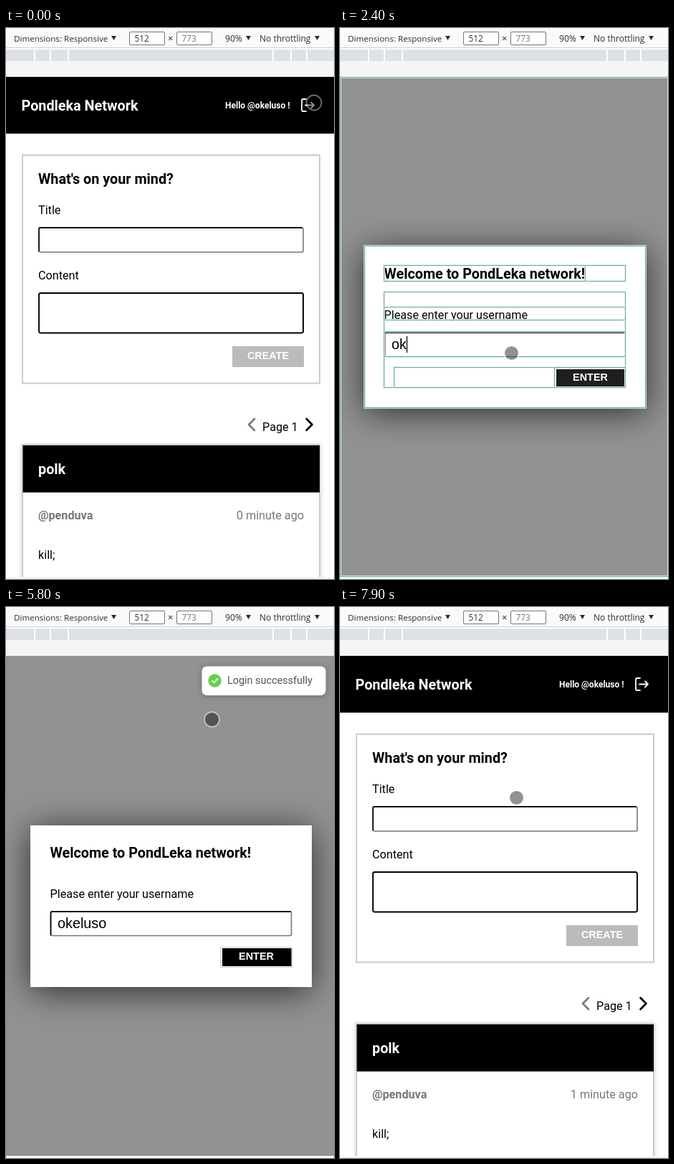
These frames come from a looping animation (458 by 767 pixels, 8000 ms). An HTML page:

```html
<!DOCTYPE html>
<html lang="en">
<head>
<meta charset="utf-8">
<title>Login flow</title>
<style>
  html, body { margin: 0; width: 100%; height: 100%; overflow: hidden; background: #fff; }
  svg { display: block; }
  text { font: 16.2px Roboto, sans-serif; white-space: pre; }
  .h { font-size: 19.8px; font-weight: 700; }
  .ui text { font: 11.8px "Open Sans", sans-serif; fill: #2b2e33; }
  .btn { font: bold 14.4px "Liberation Sans", Arial, sans-serif; fill: #fff; text-anchor: middle; }
  .field { fill: #fff; stroke: #777; stroke-width: 1.6; }
  .edge { fill: none; stroke: #111; stroke-width: 1.8; }
  .icon { fill: none; stroke-width: 2.6; stroke-linecap: round; stroke-linejoin: round; }
  #typed { font: 19.8px "Liberation Sans", Arial, sans-serif; }
  #panel { filter: drop-shadow(0 6px 24px rgba(0, 0, 0, .7)); }
  #card { filter: drop-shadow(0 1px 3px rgba(0, 0, 0, .2)); }
  .glow { fill: none; stroke: #f0f0f0; opacity: .8; }
  .line { fill: none; stroke: currentColor; }
</style>
</head>
<body>
<svg width="458" height="767" viewBox="0 0 458 767">
  <clipPath id="view"><rect y="68" width="458" height="696"/></clipPath>

  <g class="ui">
    <rect width="458" height="767" fill="#f4f5f6"/>
    <rect width="458" height="27" fill="#f9fafb"/>
    <rect y="27" width="458" height="1" fill="#cbced2"/>
    <rect y="28" width="458" height="2" fill="#fff"/>
    <rect y="30" width="458" height="16" fill="#dee1e6"/>
    <path d="M40 30v16M62 30v16M87 30v16M373 30v16M398 30v16M420 30v16" stroke="#fff" stroke-width="2"/>
    <g fill="#fff" stroke="#767676">
      <rect x="172.5" y="5.5" width="49" height="18" rx="1.5"/>
      <rect x="238.5" y="5.5" width="49" height="18" rx="1.5"/>
    </g>
    <path d="M147 11h7l-3.5 6zM335 11h7l-3.5 6zM431 11h7l-3.5 6z" fill="#2b2e33"/>
    <text x="11" y="19" style="font-size:11.6px">Dimensions: Responsive</text>
    <text x="179.500" y="19">512</text>
    <text x="226" y="19" style="font-size:13px">×</text>
    <text x="245.500" y="19" style="fill:#777">773</text>
    <text x="306" y="19" style="font-size:12.1px">90%</text>
    <text x="354" y="19" style="font-size:12px">No throttling</text>
  </g>

  <g clip-path="url(#view)">
    <g id="home">
      <rect y="68" width="458" height="696" fill="#fff"/>
      <rect y="68" width="458" height="79"/>
      <text class="h" x="21.500" y="115" fill="#fff">Pondleka Network</text>
      <text x="306" y="112" fill="#fff" style="font-size:12px;font-weight:700">Hello @okeluso !</text>
      <path class="icon" style="stroke-width:1.8" stroke="#fff"
        d="M419 99h-4q-2 0-2 2v13q0 2 2 2h4M418 107.500h12M426 103.500l4 4-4 4"/>

      <rect x="23" y="177" width="415" height="317.500" fill="#fff" stroke="#ccc" stroke-width="2"/>
      <text class="h" x="45" y="217">What's on your mind?</text>
      <text x="45" y="259">Title</text>
      <rect class="field" x="46" y="278" width="369" height="34" rx="2"/>
      <path class="edge" d="M46 311V280q0-2 2-2H414"/>
      <text x="45" y="350">Content</text>
      <rect x="46" y="369" width="369" height="55.500" rx="2.500" fill="#fff" stroke="#000" stroke-width="1.900"/>
      <rect x="316" y="443" width="100" height="29" fill="#bbb"/>
      <text class="btn" x="366" y="461">CREATE</text>

      <path class="icon" stroke="#777" d="M347 544l-8 8 8 8"/>
      <path class="icon" stroke="#000" d="M419.500 544l8 8-8 8"/>
      <text x="358" y="561">Page 1</text>

      <rect id="card" x="23" y="580" width="415" height="220" fill="#fff" stroke="#ccc" stroke-width="2"/>
      <rect x="23.500" y="581" width="414.500" height="65.500"/>
      <text class="h" x="45" y="621" fill="#fff">polk</text>
      <text x="45" y="684" fill="#777" font-weight="700" style="font-weight:700">@penduva</text>
      <text id="age" x="416" y="684" fill="#777" text-anchor="end"></text>
      <text x="45" y="739">kill;</text>
    </g>

    <g id="login">
      <rect y="68" width="458" height="696" fill="#929292"/>
      <rect id="panel" x="34" y="304" width="393" height="225" fill="#fff"/>
      <text class="h" x="61.500" y="349">Welcome to PondLeka network!</text>
      <text x="61.500" y="405">Please enter your username</text>
      <rect class="field" x="62.500" y="424" width="336" height="33.500" rx="2"/>
      <path class="edge" d="M62.500 457V426q0-2 2-2H398"/>
      <text id="typed" x="72" y="447"></text>
      <rect id="caret" y="429" width="1.200" height="23"/>
      <rect id="frame" x="299.500" y="473.500" width="100" height="28"/>
      <rect id="fill" x="302" y="475" width="96.500" height="25"/>
      <text class="btn" x="349.500" y="491">ENTER</text>
    </g>

    <g id="toast">
      <rect x="273.500" y="82.500" width="173" height="40.500" rx="7" fill="#fff"
        style="filter:drop-shadow(0 1px 4px rgba(0,0,0,.25))"/>
      <g id="badge">
        <circle r="9.200" fill="#61d345"/>
        <path id="tick" class="icon" style="stroke-width:2" stroke="#fff" d="M-3.500.5l2.500 2.500 4.500-5.500"/>
      </g>
      <text x="309" y="107" fill="#555" style="font-size:14.4px">Login successfully</text>
    </g>

    <g id="marks"></g>
    <g id="pointer">
      <circle id="dot" r="9.500"/>
      <circle r="10.500" fill="none" stroke="#fff" stroke-opacity=".42" stroke-width="1.800"/>
    </g>
  </g>
</svg>
<script>
const $ = id => document.getElementById(id);
const NAME = 'okeluso';
const KEYS = [2200, 2300, 2900, 3000, 3000, 3100, 3200];
const TEAL = '#55b5ac';
// highlight colour after each key press
const HEAT = [TEAL, '#63b19e', '#80b393', '#97b488', '#abb67d', '#beb771', '#cfb965'];
// pointer stops: time, x, y
const PATH = [
  [0, 430, 104], [300, 430, 104], [800, 247, 490], [1000, 239.5, 459], [1200, 239.5, 452.5],
  [4000, 239.5, 452.5], [4800, 287.5, 156.5], [7400, 287.5, 156.5], [7900, 246.5, 265.5], [8000, 246.5, 265.5]
];
// highlight boxes: left, top, right, bottom
const BOXES = {
  page: [[0, 68, 459, 764]],
  form: [[34, 303, 427, 529], [61, 330, 399, 353], [61, 330, 343, 353], [61, 367, 399, 501],
         [61, 388, 399, 407], [61, 422, 399, 458], [75, 472, 399, 501], [299, 472, 399, 501]],
  tray: [[14, 82, 447, 749]],
  note: [[273, 82, 447, 123], [279, 90, 305, 116], [282, 93, 302, 113], [286, 97, 298, 109], [309, 93, 430, 113]]
};

const clamp = v => Math.max(0, Math.min(1, v));
const mix = (a, b, p) => a + (b - a) * p;
const out = (p, power) => 1 - (1 - clamp(p)) ** power;
const show = (id, on) => { $(id).style.display = on ? '' : 'none'; };

const ring = (cls, [l, t, r, b], d) =>
  `<rect class="${cls}" x="${l + d}" y="${t + d}" width="${r - l - 2 * d}" height="${b - t - 2 * d}"/>`;
$('marks').innerHTML = Object.entries(BOXES).map(([id, list]) => `<g id="${id}">` +
  list.map(b => ring('glow', b, -.5) + ring('glow', b, 1.5) + ring('line', b, .5)).join('') + '</g>').join('');

function mark(id, on, color) {
  show(id, on);
  $(id).style.color = color;
}

function pointerAt(t) {
  const i = PATH.findIndex(p => p[0] > t);
  const [t0, x0, y0] = PATH[i - 1], [t1, x1, y1] = PATH[i];
  const u = (t - t0) / (t1 - t0), p = u * u * (3 - 2 * u);
  return [mix(x0, x1, p), mix(y0, y1, p)];
}

function drawToast(t) {
  show('toast', t >= 3400 && t < 7340);
  const enter = out((t - 3400) / 350, 3), leave = out((t - 6940) / 400, 4);
  const scale = mix(.6, 1, enter) - .4 * leave;
  const y = -82 * (1 - enter) - 61 * leave;
  $('toast').setAttribute('transform', `translate(360 ${102.5 + y}) scale(${scale}) translate(-360 -102.5)`);
  $('toast').setAttribute('opacity', mix(.5, 1, enter) * (1 - leave));
  const pop = out((t - 3500) / 300, 3);
  $('badge').setAttribute('transform', `translate(291.5 102.5) rotate(${45 * (pop - 1)}) scale(${pop})`);
  show('tick', t >= 3700);
}

function draw(t) {
  const login = t >= 200 && t < 7000;
  show('home', !login);
  show('login', login);
  $('age').textContent = (t < 7000 ? 0 : 1) + ' minute ago';

  const count = KEYS.filter(k => k <= t).length;
  $('typed').textContent = NAME.slice(0, count);
  const typing = t >= 2200 && t < 3300;
  show('caret', t >= 1300 && (typing || (t - 1300) % 1000 < 500));
  if (login) $('caret').setAttribute('x', 72 + $('typed').getComputedTextLength());

  const grey = mix(187, 0, clamp((t - 2200) / 240));
  $('fill').setAttribute('fill', `rgb(${grey},${grey},${grey})`);
  $('frame').setAttribute('fill', count ? '#fff' : '#bbb');
  $('frame').setAttribute('stroke', count ? '#ccc' : '#bbb');

  const opened = t >= 200 && t < 500, closed = t >= 7000 && t < 7500;
  const edited = (t >= 2200 && t < 2600) || (t >= 2900 && t < 4100);
  const heat = edited ? HEAT[count - 1] : TEAL;
  mark('page', opened || edited || closed, heat);
  mark('form', edited, heat);
  mark('tray', (t >= 3400 && t < 4100) || closed, TEAL);
  mark('note', closed, TEAL);

  drawToast(t);
  $('pointer').setAttribute('transform', `translate(${pointerAt(t)})`);
  $('dot').setAttribute('fill-opacity', t >= 1300 && t < 1600 ? .6 : .43);
}

function tick(now) {
  draw(Math.floor(now % 8000 / 100) * 100);
  requestAnimationFrame(tick);
}
draw(0);
requestAnimationFrame(tick);
</script>
</body>
</html>
```
